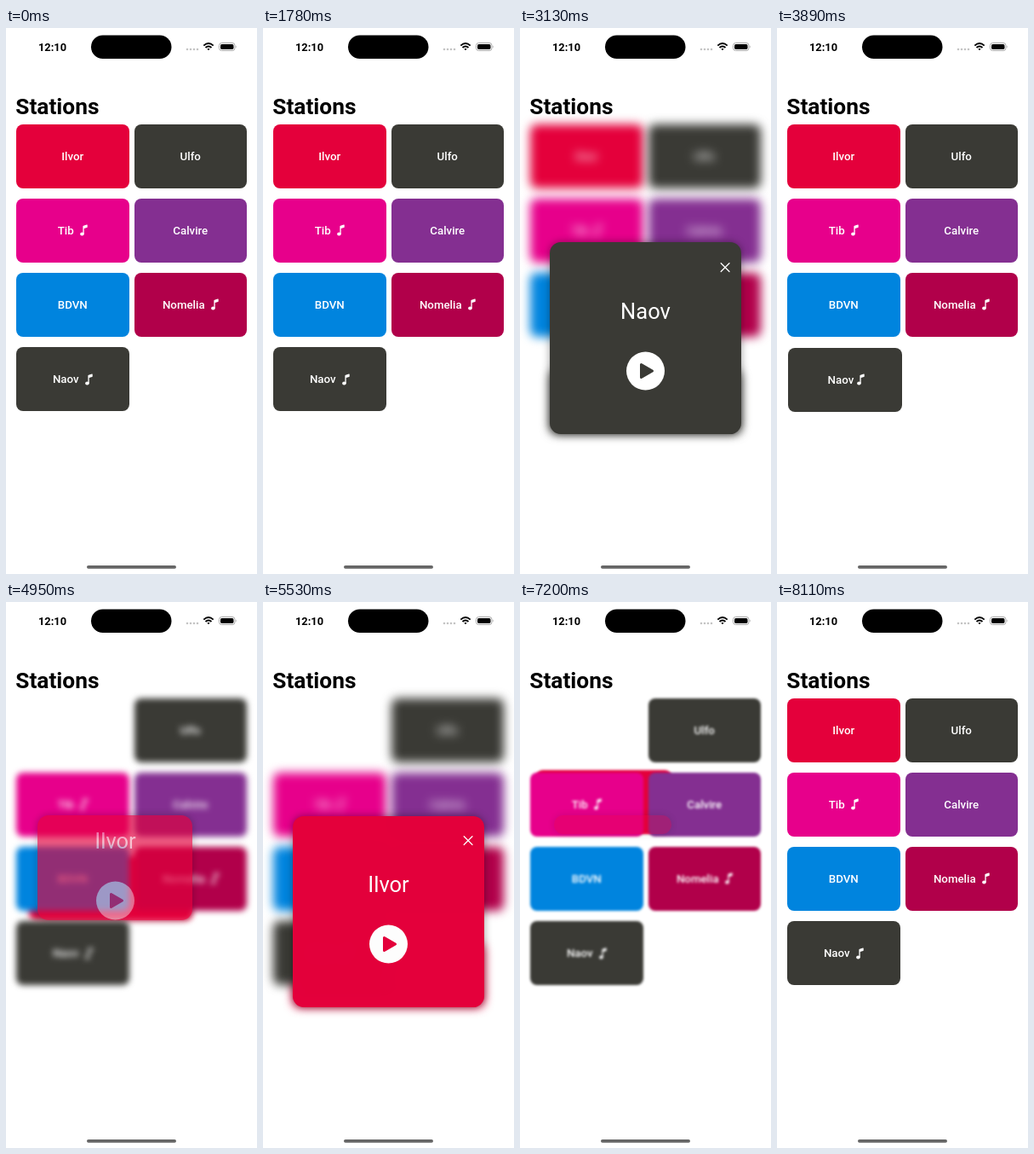
An HTML page for the animation above (9340 ms loop, 295 by 640 pixels).

```html
<!DOCTYPE html>
<html lang="fr">
<head>
<meta charset="utf-8">
<title>Stations</title>
<style>
  html, body { margin: 0; width: 100%; height: 100%; overflow: hidden; background: #fff; }
  body { position: relative; font-family: Roboto, sans-serif; }
  svg { display: block; }
  #chrome { position: absolute; left: 0; top: 0; }
  .tile, #card { position: absolute; box-sizing: border-box; color: #fff; }
  .tile {
    height: 75px; border-radius: 8px; display: flex; gap: 7px;
    align-items: center; justify-content: center; font: 500 13.3px Roboto, sans-serif;
  }
  #card { border-radius: 13px; overflow: hidden; box-shadow: 0 0 10px rgba(0, 0, 0, .4); }
  #detail { position: absolute; left: 50%; top: 50%; width: 225px; height: 225px; margin: -112.5px; }
</style>
</head>
<body>
<svg id="chrome" width="295" height="640" viewBox="0 0 295 640">
  <text x="38" y="26.5" font-size="12.8" font-weight="600">12:10</text>
  <rect x="100" y="8.5" width="94.5" height="27.5" rx="13.75"/>
  <g fill="#c4c4c4">
    <circle cx="213" cy="25" r="1.3"/><circle cx="217" cy="25" r="1.3"/>
    <circle cx="221" cy="25" r="1.3"/><circle cx="225" cy="25" r="1.3"/>
  </g>
  <g fill="none" stroke="#000" stroke-width="1.9">
    <path d="M232.3 20.6Q238 15.4 243.7 20.6M234.5 23Q238 19.9 241.5 23"/>
    <path d="M238 26.2L236.4 24.5Q238 23.3 239.6 24.5Z" fill="#000" stroke="none"/>
  </g>
  <rect x="250.5" y="17.5" width="18.5" height="9" rx="3" fill="none" stroke="#a8a8a8"/>
  <rect x="252" y="19" width="15.5" height="6" rx="1.7"/>
  <path d="M270 20.3Q271.6 22 270 23.7Z" fill="#a8a8a8"/>
  <text x="11.3" y="100.5" font-size="26.3" font-weight="700">Stations</text>
  <rect x="95" y="630" width="105" height="3.7" rx="1.85" fill="#666"/>
</svg>
<div id="card">
  <svg id="detail" viewBox="0 0 225 225">
    <text id="name" x="112.5" y="90" fill="#fff" font-size="25.5" text-anchor="middle"></text>
    <path d="M201.2 24.7L211 34.5M211 24.7L201.2 34.5" stroke="#fff" stroke-width="1.3" stroke-linecap="round"/>
    <circle cx="112.5" cy="151" r="22.5" fill="#fff"/>
    <path id="play" d="M107.5 143.5V158.5L120.5 151Z" stroke-width="3" stroke-linejoin="round"/>
  </svg>
</div>
<script>
const LOOP = 9340, BLUR = 6;
const OPEN = { x: 35, y: 251, r: 260, b: 476 };
const DARK = '#3a3a35';
const stations = [
  ['Ilvor', '#e4003b'], ['Ulfo', DARK],
  ['Tib', '#e7008b', true], ['Calvire', '#842f91'],
  ['BDVN', '#0084de'], ['Nomelia', '#b1004a', true],
  ['Naov', DARK, true],
];
const visits = [
  { station: 6, open: 1790, close: 3300 },
  { station: 0, open: 4720, close: 6940 },
];
const note = `<svg width="9" height="14" viewBox="0 0 9 14" fill="#fff">
  <ellipse cx="2.4" cy="11.5" rx="2.3" ry="1.9"/>
  <path d="M3.4 11.5V2.6Q3.4 1.9 4.1 1.7L7.9.5Q8.7.3 8.7 1.1V3.2Q8.7 3.8 8.1 4L4.7 5V11.5Z"/></svg>`;

const $ = id => document.getElementById(id);
const card = $('card');

const tiles = stations.map(([name, color, music], i) => {
  const el = document.createElement('div');
  el.className = 'tile';
  el.style.background = color;
  el.innerHTML = `<span>${name}</span>${music ? note : ''}`;
  document.body.insertBefore(el, card);
  const x = i % 2 ? 150.5 : 12, y = 112.5 + 87.2 * (i >> 1);
  return { el, label: el.firstChild, box: { x, y, r: x + 132.5, b: y + 75 } };
});

// Critically damped spring from 0 to 1
function spring(ms) {
  const k = Math.max(0, ms) * .0095;
  return 1 - (1 + k) * Math.exp(-k);
}

const mix = (a, b, q) => a + (b - a) * q;

function place(el, x, y, r, b) {
  Object.assign(el.style, {
    left: x + 'px', top: y + 'px',
    width: Math.max(0, r - x) + 'px', height: Math.max(0, b - y) + 'px',
  });
}

function draw(t) {
  const visit = t < 4600 ? visits[0] : visits[1];
  let q = t < visit.close ? spring(t - visit.open) : 1 - spring(t - visit.close);
  if (q < .002) q = 0;

  tiles.forEach(({ el, label, box }, i) => {
    const active = i === visit.station ? q : 0;
    const b = mix(box.b, OPEN.b, active);
    place(el, mix(box.x, OPEN.x, active), b - 75, mix(box.r, OPEN.r, active), b);
    el.style.filter = q > .03 ? `blur(${BLUR * q}px)` : 'none';
    label.style.transform = `translateX(${3 * Math.min(1, active * 45)}px)`;
  });

  const [name, color] = stations[visit.station];
  const { box } = tiles[visit.station];
  place(card,
    mix(box.x + 30, OPEN.x, q), mix(box.y + 137, OPEN.y, q),
    mix(box.r, OPEN.r, q), mix(box.b, OPEN.b, q));
  card.style.background = color;
  card.style.opacity = q;
  $('detail').style.opacity = q;
  $('name').textContent = name;
  $('play').setAttribute('fill', color);
  $('play').setAttribute('stroke', color);
}

const start = performance.now();
function tick() {
  draw((performance.now() - start) % LOOP);
  requestAnimationFrame(tick);
}
tick();
</script>
</body>
</html>
```
